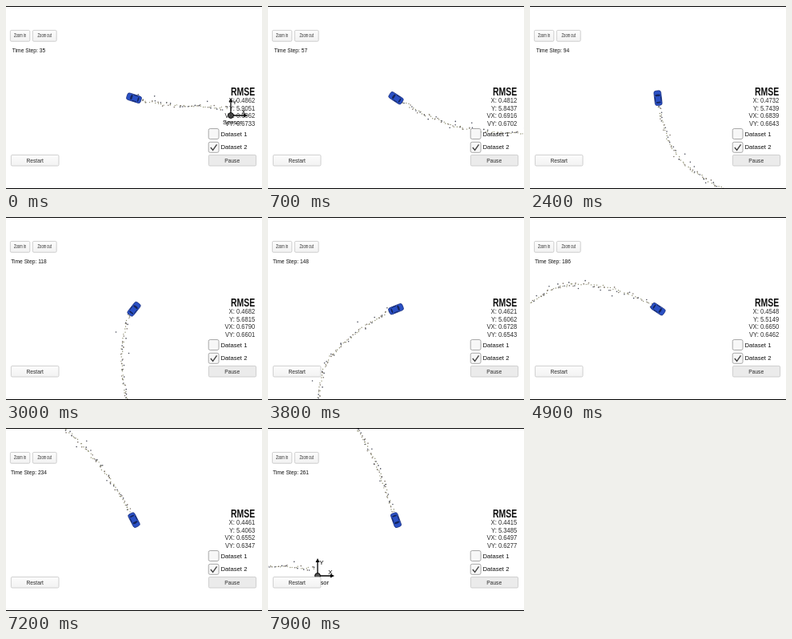
Write an HTML page that moves like this. It is 320 by 229 pixels and loops after 8 s.

```html
<!DOCTYPE html>
<html lang="en">
<head>
<meta charset="utf-8">
<title>Vehicle tracking</title>
<style>
html, body { margin: 0; width: 100%; height: 100%; overflow: hidden; background: #fff; }
svg { display: block; width: 320px; height: 229px; font: 6.7px "Liberation Sans", Arial, sans-serif; fill: #2d2d2d; }
.button { fill: url(#face); stroke: #c4c4c4; stroke-width: .8; }
.box { fill: #f7f7f7; stroke: #a0a0a0; stroke-width: .9; }
.mid { text-anchor: middle; }
.end { text-anchor: end; }
.label { font-size: 7.7px; fill: #111; }
</style>
</head>
<body>
<svg viewBox="0 0 320 229">
  <defs>
    <linearGradient id="face" x2="0" y2="1">
      <stop stop-color="#fcfcfc"/><stop offset="1" stop-color="#f2f2f2"/>
    </linearGradient>
  </defs>
  <rect width="320" height="229" fill="#fff"/>

  <g id="world">
    <g id="trail"></g>
    <g id="sensor" fill="#000">
      <path d="M0 0V-18M0 0H17" stroke="#000" stroke-width="1.3"/>
      <path d="M0-22l-2.5 5h5zM21 0l-5-2.5v5z"/>
      <circle r="3.4" fill="#555" stroke="#000"/>
      <text x="5" y="-14" class="mid" font-size="8">Y</text>
      <text x="16" y="-2.5" class="mid" font-size="8">X</text>
      <text x="2" y="10.5" class="mid" font-size="7.6">Sensor</text>
    </g>
  </g>

  <g id="car">
    <rect x="-9.2" y="-4.4" width="18.4" height="8.8" rx="2.6" fill="#2a50c4" stroke="#152a78" stroke-width=".7"/>
    <path d="M4-3.4Q5.6 0 4 3.4L2.2 2.7V-2.7zM-6-3.2Q-7 0-6 3.2L-4.7 2.5V-2.5z" fill="#14245c"/>
    <path d="M-4-3.6H1.5M-4 3.6H1.5" stroke="#14245c" stroke-width=".8"/>
  </g>

  <rect class="button" x="5.4" y="30.4" width="24.4" height="13.8" rx="1.5"/>
  <rect class="button" x="33.4" y="30.4" width="29.8" height="13.8" rx="1.5"/>
  <rect class="button" x="6.4" y="186.4" width="59.6" height="13.6" rx="1.5"/>
  <rect class="button" x="253.4" y="186.4" width="59.2" height="13.6" rx="1.5" style="fill:#ebebeb"/>
  <g class="mid">
    <text transform="translate(17.5 39.4) scale(.62 1)">Zoom in</text>
    <text transform="translate(48.3 39.4) scale(.62 1)">Zoom out</text>
    <text x="36.2" y="195.6">Restart</text>
    <text x="282.7" y="195.6">Pause</text>
    <text id="step" x="28.5" y="58.4" fill="#111"></text>
  </g>

  <rect class="box" x="253.2" y="153.5" width="12.8" height="13" rx="2"/>
  <rect class="box" x="253.2" y="170.3" width="12.8" height="13" rx="2"/>
  <path d="M255.8 177l2.8 3.4 4.9-7" fill="none" stroke="#444" stroke-width="1.4"/>
  <text class="label" x="268.5" y="162.6">Dataset 1</text>
  <text class="label" x="268.5" y="179.4">Dataset 2</text>

  <g class="end">
    <text transform="translate(311.2 112) scale(.75 1)" font-size="14" font-weight="bold" fill="#111">RMSE</text>
    <g id="errors" transform="translate(311.2 0) scale(.83 1)" font-size="9.2"></g>
  </g>
  <path d="M0 .5H320M0 228.5H320" stroke="#000"/>
</svg>
<script>
const $ = id => document.getElementById(id);
const clamp = (v, lo, hi) => Math.min(hi, Math.max(lo, v));
const FIRST = 35, LAST = 261;

// Key points of the course: [time step, x, y], relative to the sensor
const course = [
  [0, 0, -9], [35, -121, -22], [69, -223, -80], [85, -247, -129],
  [101, -254, -184], [118, -239, -242], [148, -157, -303], [167, -95, -302],
  [186, -32, -276], [207, 20, -226], [235, 69, -149], [261, 98, -70]
];
// Uneven playback: [tick, time step]
const pace = [[0, FIRST], [11, 69], [23, 118], [31, 148], [48, 207], [62, LAST]];
// Error at the first, middle and last time step
const readings = {
  X: [.4862, .4621, .4415], Y: [5.9051, 5.6062, 5.3485],
  VX: [.6962, .6728, .6497], VY: [.6733, .6543, .6277]
};

// Index of the segment holding key, and the fraction along it
function locate(table, key) {
  let i = 0;
  while (i < table.length - 2 && table[i + 1][0] <= key) i++;
  return [i, (key - table[i][0]) / (table[i + 1][0] - table[i][0])];
}

function slope(i, axis) {
  const a = course[Math.max(i - 1, 0)], b = course[Math.min(i + 1, course.length - 1)];
  return (b[axis] - a[axis]) / (b[0] - a[0]);
}

// Smooth cubic through the course
function position(step) {
  const [i, u] = locate(course, step), p = course[i], q = course[i + 1], h = q[0] - p[0];
  return [1, 2].map(axis => {
    const v = 1 - u;
    return v * v * (1 + 2 * u) * p[axis] + u * u * (3 - 2 * u) * q[axis]
      + h * u * v * (v * slope(i, axis) - u * slope(i + 1, axis));
  });
}

// Parabola through three evenly spaced values
function parabola([a, b, c], step) {
  const u = 2 * (step - FIRST) / (LAST - FIRST);
  return a + (b - a) * u + (a - 2 * b + c) * u * (u - 1) / 2;
}

let seed = 11;
const random = () => (seed = seed * 16807 % 2147483647) / 2147483647;
const noise = () => random() + random() + random() - 1.5;

// Each step leaves an estimate near the course and a lidar or radar reading
const marks = [];
for (let s = 1; s <= LAST; s++) {
  const [x, y] = position(s), radar = s % 2;
  const group = document.createElementNS('http://www.w3.org/2000/svg', 'g');
  const dot = (spread, r, fill) =>
    `<circle cx="${x + noise() * spread}" cy="${y + noise() * spread}" r="${r}" fill="${fill}"/>`;
  const spread = radar ? 3 + 9 * random() ** 3 : 3;
  group.innerHTML = dot(1.8, .7, '#8b8c6c') + dot(spread, .8, radar ? '#474a58' : '#7b7168');
  marks.push($('trail').appendChild(group));
}

$('errors').innerHTML = Object.keys(readings).map((_, i) => `<text y="${121.3 + i * 9.6}"/>`).join('');

function draw(time) {
  const beat = Math.floor(time % 8000 / 100);
  // Playback stalls twice
  const tick = Math.min(beat, 10) + clamp(beat - 17, 0, 32) + clamp(beat - 59, 0, 20);
  const [i, u] = locate(pace, tick);
  const step = Math.round(pace[i][1] + (pace[i + 1][1] - pace[i][1]) * u);

  const [x, y] = position(step), a = position(step - 1), b = position(Math.min(step + 1, LAST));
  const angle = Math.atan2(b[1] - a[1], b[0] - a[0]) * 180 / Math.PI;
  $('world').setAttribute('transform', `translate(${160 - x} ${115 - y})`);
  $('car').setAttribute('transform', `translate(160 115.2) rotate(${angle})`);
  marks.forEach((mark, s) => mark.style.display = s < step ? '' : 'none');

  $('step').textContent = 'Time Step: ' + step;
  Object.entries(readings).forEach(([name, values], k) =>
    $('errors').children[k].textContent = `${name}: ${parabola(values, step).toFixed(4)}`);
}

const start = performance.now();
function loop() {
  draw(performance.now() - start);
  requestAnimationFrame(loop);
}
loop();
</script>
</body>
</html>
```
